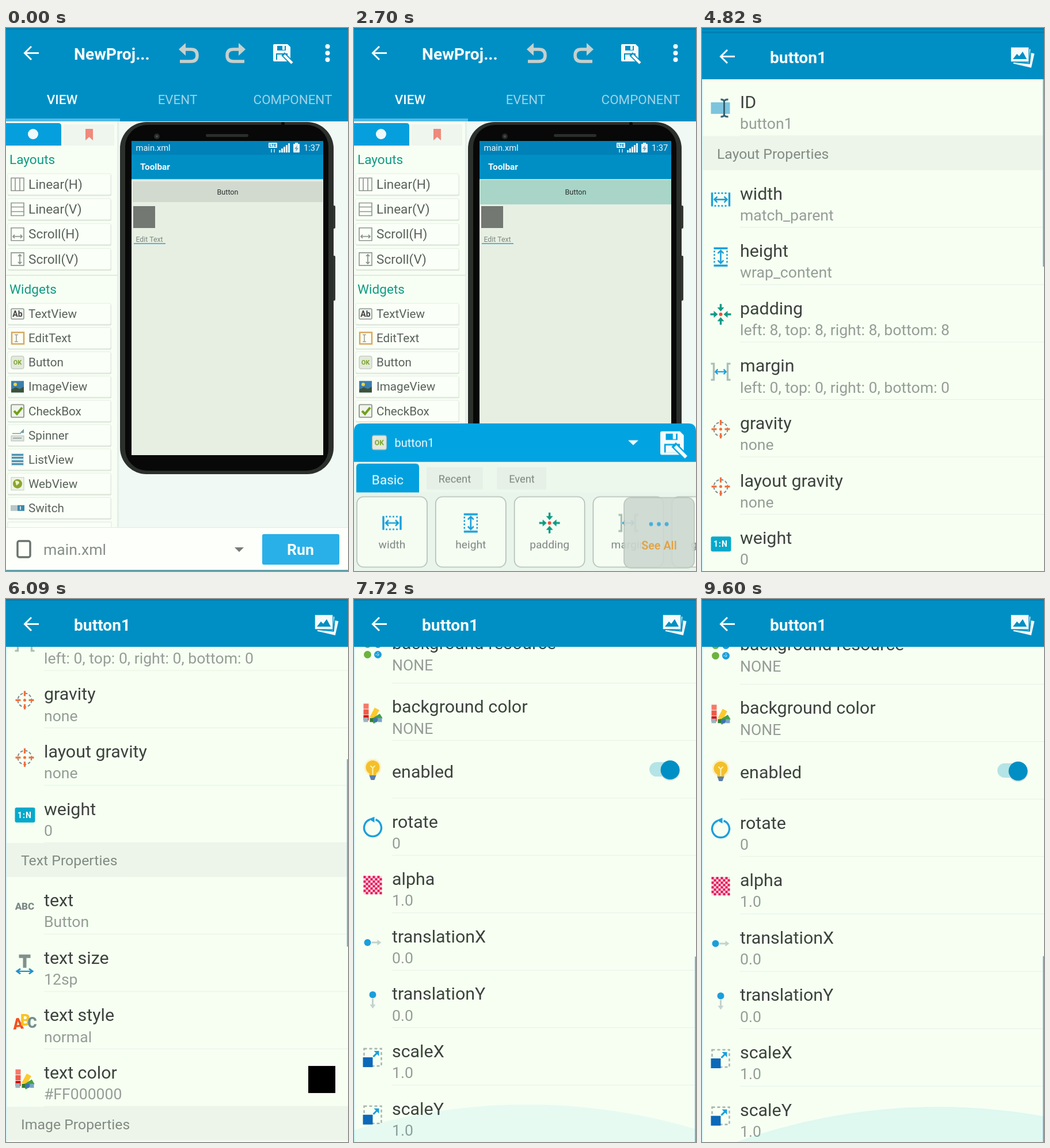
Recreate the animation shown at these times as an HTML page. Size 594x942 px, loop 9690 ms.

```html
<!DOCTYPE html>
<html lang="en">
<head>
<meta charset="utf-8">
<title>App builder: widget properties</title>
<style>
@property --s { syntax: '<number>'; inherits: true; initial-value: 0; }
html, body { margin: 0; width: 100%; height: 100%; overflow: hidden; background: #f7fff3; }
svg { display: block; width: 100%; height: 100%; font-family: Roboto, sans-serif; }
.sel, .sheet, .page, .glow { animation: 9690ms linear infinite; }
.sel { animation-name: sel; }
.sheet { animation-name: sheet; }
.page { animation-name: open, scroll; }
.glow { animation-name: glow; fill: #0ab4d6; }
.list { transform: translateY(calc(var(--s) * -1px)); }
.bar { transform: translateY(calc(var(--s) * .379px)); }
@keyframes sel {
  0%, 24.76% { opacity: 0; }
  24.77%, 100% { opacity: 1; }
}
@keyframes sheet {
  0%, 24.4% { transform: translateY(264px); animation-timing-function: cubic-bezier(.2, .5, .3, 1); }
  28.8%, 100% { transform: none; }
}
@keyframes open {
  0%, 45.7% { transform: translateY(75px); opacity: 0; }
  45.8% { transform: translateY(75px); opacity: .1; animation-timing-function: ease-out; }
  48% { opacity: 1; }
  49.74% { transform: translateY(6px); animation-timing-function: ease-out; }
  51.5%, 100% { transform: none; opacity: 1; }
}
@keyframes scroll {
  0%, 58.9% { --s: 0; animation-timing-function: cubic-bezier(.4, .1, .7, .9); }
  62.85% { --s: 513.5; animation-timing-function: cubic-bezier(.15, .6, .4, 1); }
  68.4%, 71.8% { --s: 680; animation-timing-function: cubic-bezier(.4, .1, .5, 1); }
  79%, 96% { --s: 1417.7; }
  99%, 100% { --s: 1415.8; }
}
@keyframes glow {
  0%, 78.4% { transform: translate(300px, 945px); opacity: .03; }
  79.6%, 82% { transform: translate(300px, 877px); opacity: .07; }
  87% { transform: translate(300px, 945px); opacity: 0; }
  96% { transform: translate(410px, 945px); opacity: .03; }
  99%, 100% { transform: translate(410px, 881px); opacity: .1; }
}
</style>
</head>
<body>
<svg id="stage" viewBox="0 0 594 942"></svg>
<script>
const BLUE = '#008fc4', SKY = '#1a9fdc', GREY = '#8d968e', GREEN = '#0f9a85', ORANGE = '#f0703c';

const rect = (x, y, w, h, fill, more = '') =>
  `<rect x="${x}" y="${y}" width="${w}" height="${h}" fill="${fill}" ${more}/>`;
const dot = (x, y, r, fill, more = '') => `<circle cx="${x}" cy="${y}" r="${r}" fill="${fill}" ${more}/>`;
const line = (d, color, w = 2, more = '') =>
  `<path d="${d}" fill="none" stroke="${color}" stroke-width="${w}" ${more}/>`;
const fill = (d, color) => `<path d="${d}" fill="${color}"/>`;
const at = (x, y, body, more = '') => `<g transform="translate(${x} ${y}) ${more}">${body}</g>`;
// cy is the middle of the text line
const text = (x, cy, size, str, color, more = '') =>
  `<text x="${x}" y="${cy + size * .345}" font-size="${size}" fill="${color}" ${more}>${str}</text>`;
const MID = 'text-anchor="middle"', BOLD = 'font-weight="700"';

const arrows = color => line('M-11 0H11M-6-5L-11 0L-6 5M6-5L11 0L6 5', color, 2.6);
const spin = (body, deg) => `<g transform="rotate(${deg})">${body}</g>`;
const around = body => [0, 90, 180, 270].map(a => spin(body, a)).join('');

const widthIcon = line('M-15-12V12M15-12V12', SKY, 3.4) +
  line('M-11-11H12M-11 11H12', SKY, 2.6, 'stroke-dasharray="3 3"') + arrows(SKY);
const swatches = ['#f47a68', '#ee5a4a', '#d50000'].map((c, i) => rect(-16, -16 + i * 10, 9, 9, c)).join('') +
  at(-5, 7, rect(0, -18, 9, 18, '#fdc92c'), 'rotate(28)') +
  at(-3, 11, rect(0, -18, 9, 18, '#43a047'), 'rotate(58)') +
  rect(-16, 8, 8, 8, '#9fb3bb') + rect(-5, 9, 6, 7, '#2e7d32') + rect(2, 9, 6, 7, '#3e74b5') + rect(9, 9, 7, 7, '#7ba4c9');
let checks = rect(-16, -16, 32, 32, '#fbd3dc');
for (let i = 0; i < 64; i++) {
  const x = i % 8, y = i >> 3;
  if ((x + y) % 2 === 0) checks += rect(-16 + x * 4, -16 + y * 4, 4, 4, '#e3155a');
}
const slide = dot(-9, 0, 6, SKY) + line('M-2 0H11', '#c3d3cc', 3) + fill('M8-5L15 0L8 5Z', '#c3d3cc');
const letters = (size, colors) => [...'ABC'].map((ch, i) =>
  text(-11 + i * 11, 0, size, ch, colors[i], MID + ' font-weight="900"')).join('');
const grow = line('M-15-15H15V15H-15Z', '#a9b8ae', 2.6, 'stroke-dasharray="5 4"') +
  rect(-17, 0, 17, 17, '#0c68b8') + line('M1-1L8-8', SKY, 3) + fill('M2-11H11V-2Z', SKY);

const icons = {
  id: rect(-17, -10, 33, 20, '#7cc4de') + line('M6-12V12M0-15Q6-15 6-11Q6-15 13-15M0 15Q6 15 6 11Q6 15 13 15', '#37606f', 3),
  width: widthIcon,
  height: spin(widthIcon, 90),
  padding: around(line('M-18 0H-9', GREEN, 3.4) + fill('M-12-6L-5 0L-12 6Z', GREEN)) + dot(0, 0, 3, '#f0503c'),
  margin: line('M-17-14H-12V14H-17M17-14H12V14H17', '#aebfb5', 3.4) + at(0, 0, arrows(SKY), 'scale(.85)'),
  gravity: dot(0, 0, 12, 'none', 'stroke="#7d8a88" stroke-width="2" stroke-dasharray="5 3"') +
    around(line('M-16 0H-7', ORANGE, 3.2)) + dot(0, 0, 2.5, ORANGE),
  weight: rect(-17, -13, 35, 26, '#06a9cb', 'rx="3"') + text(0, 0, 14, '1:N', '#fff', MID + BOLD + ' letter-spacing="1"'),
  text: letters(17, ['#7d8a86', '#7d8a86', '#7d8a86']),
  size: line('M-10-13H10M0-14V7', '#81908d', 6) + at(0, 13, arrows('#2492c9'), 'scale(1.25 .9)'),
  style: spin(text(-12, 3, 27, 'A', '#f4511e', MID + ' font-weight="900"'), -6) +
    text(1, -2, 27, 'B', '#fbc31e', MID + ' font-weight="900"') + text(13, 3, 25, 'C', '#73908f', MID + ' font-weight="900"'),
  color: swatches,
  resource: dot(-9, -9, 6.5, '#6cb33f') + dot(9, -9, 6.5, SKY) + dot(-9, 9, 6.5, '#6cb33f') + dot(9, 9, 6.5, SKY) +
    line('M5 9H13M9 5V13', '#bfe4f5', 1.5, 'stroke-dasharray="2 2"'),
  bulb: dot(0, -5, 15, '#fbf1c8') + dot(0, -5, 12, '#f3c02a') + fill('M-6 4H6V9H-6Z', '#f3c02a') +
    line('M-4-8L0-4L4-8M0-4V8', '#fff3b8', 2) + fill('M-6 9H6L3 17H-3Z', '#5b7fa8'),
  rotate: line('M-5-14A15 15 0 1 0 5-14', SKY, 3.4) + fill('M-7-15L3-19V-9Z', SKY),
  alpha: checks,
  moveX: slide,
  moveY: spin(slide, 90),
  scale: grow
};

const backArrow = line('M57 43.5H33M44 32L32.5 43.5L44 55', '#f4fbfb', 3);
const save = bg => fill('M2 0H25L30 5V28Q30 30 28 30H2Q0 30 0 28V2Q0 0 2 0Z', '#f6fcfa') +
  rect(7, 3, 15, 8, bg) + rect(16, 3, 4, 7, '#f6fcfa') + rect(5, 16, 20, 11, bg) + rect(7, 18, 16, 9, '#f6fcfa') +
  line('M17 17L32 32', bg, 8) + line('M19 19L33 33', '#f6fcfa', 4.5);
const undo = line('M308 37H321Q332 37 332 47.5Q332 58 321 58H302', '#c6d0cc', 5.5) + fill('M300 37L312 26V48Z', '#c6d0cc');
const okIcon = rect(-11, -11, 22, 22, '#e3e9dd', 'rx="3" stroke="#b4bdb2"') + text(0, 0, 11, 'OK', '#7ba52c', MID + BOLD);

function panel() {
  const box = line('M-11-11H11V11H-11Z', GREY, 1.6);
  const bars = box + line('M-4-11V11M4-11V11', GREY, 1.6);
  const pan = box + line('M-8 4H8M-5 1L-8 4L-5 7M5 1L8 4L5 7', GREY, 1.8);
  const layouts = [['Linear(H)', bars], ['Linear(V)', spin(bars, 90)], ['Scroll(H)', pan], ['Scroll(V)', spin(pan, -90)]];
  const widgets = [
    ['TextView', rect(-11, -9, 22, 18, '#eef2ec', 'rx="2" stroke="#8d968e" stroke-width="1.5"') + text(0, 0, 14, 'Ab', '#444', MID + BOLD)],
    ['EditText', rect(-10, -10, 21, 20, '#fdfdf4', 'stroke="#d8a860" stroke-width="2.5"') + line('M-5-6H1M-2-6V6M-5 6H1', GREY, 1.4)],
    ['Button', okIcon],
    ['ImageView', rect(-11, -10, 22, 20, '#3a7fae') + dot(-4, -4, 3, '#f2d23c') + fill('M-11 10V5L-3 1L4 4L11 0V10Z', '#3d5238')],
    ['CheckBox', rect(-11, -11, 22, 22, '#f0f4ea', 'rx="2" stroke="#8d968e" stroke-width="1.8"') + line('M-6 0L-1 5L8-6', '#6fa01e', 4)],
    ['Spinner', rect(-11, 1, 22, 9, '#dfe6e2', 'stroke="#b5c0b8"') + line('M-8 5H7M-9-3H6', GREY, 1.5) + fill('M4-4L11-11V-4Z', '#6f9cae')],
    ['ListView', rect(-11, -11, 22, 22, '#d5e5ea') + line('M-10-8H10M-10-3H10M-10 3H10M-10 8H10', '#4a93b0', 3)],
    ['WebView', rect(-11, -11, 22, 22, '#eef3ea', 'stroke="#c5cec3"') + dot(0, 0, 8, '#8aa62c') + fill('M-4-5Q3-6 3-1L-2 3Z', '#eef3c8')],
    ['Switch', rect(-12, -5, 12, 10, '#b9c6c8') + rect(0, -5, 12, 10, '#3f87ac') + rect(4, -3, 2, 6, '#cfe3ea')]
  ];
  const card = (cy, size, [name, icon]) => rect(3, cy - 17, 180, 37, '#dce4da', 'rx="2"') +
    rect(3, cy - 18.5, 179, 36.5, '#fafff7', 'rx="2" stroke="#e6ede4"') + at(20, cy, icon) + text(39, cy, size, name, '#59625b');
  return rect(0, 162, 194, 706, '#f7fff4') + rect(193, 162, 3, 706, '#e6eeea') +
    fill('M0 204V165H91Q96 165 96 170V204Z', '#069fdd') + dot(47, 184, 9, '#eef9fb') +
    rect(100, 167, 88, 37, '#eff6ee') + fill('M138 175H151V195L144.500 189L138 195Z', '#ef8a7c') +
    text(6, 228, 22.6, 'Layouts', GREEN) + layouts.map((w, i) => card(271.3 + i * 43.2, 22.6, w)).join('') +
    rect(0, 428, 194, 2, '#e2eae1') + text(6, 453, 22.6, 'Widgets', GREEN) +
    widgets.map((w, i) => card(496 + i * 42.1, 20.7, w)).join('') + rect(3, 857, 180, 12, '#fafff7', 'stroke="#e0e8de"');
}

function phone() {
  const signal = [4, 7, 10, 13, 16].map((h, i) => rect(474 + i * 4, 216 - h, 3, h, '#e8f5f8')).join('');
  return rect(566, 308, 6, 40, '#343834', 'rx="2"') + rect(566, 395, 6, 78, '#343834', 'rx="2"') +
    rect(198, 163, 371, 611, '#2c302c', 'rx="46"') + rect(207, 168, 353, 600, '#070807', 'rx="38"') +
    dot(262, 188, 5, '#262a28') + dot(262, 188, 2, '#4a504d') + rect(347, 184, 74, 5, '#2a2e2b', 'rx="2.5"') + dot(481, 166, 3, '#0a0b0a') +
    rect(218, 196, 333, 545, '#e7efe3') + rect(218, 196, 333, 24, '#0081b8') + rect(218, 220, 333, 42, BLUE) + rect(218, 262, 333, 2, '#cfd8cf') +
    text(225.5, 208, 14.7, 'main.xml', '#eef8fa') + text(233, 241, 15.4, 'Toolbar', '#f4fbfc', BOLD) +
    rect(456, 199, 15, 9, '#e8f5f8', 'rx="1"') + text(463.5, 203.5, 7.5, 'LTE', '#0081b8', MID + BOLD) +
    line('M461 210V216M466 210V216', '#9fd2e4', 2) + signal +
    rect(499, 201, 11, 15, '#e8f5f8', 'rx="1"') + rect(502, 199, 5, 3, '#e8f5f8') + fill('M506 203L501 210H504L503 215L508 208H505Z', '#7fa9ba') +
    text(517, 208, 14.7, '1:37', '#eef8fa') +
    rect(220, 266, 330, 36, '#d2dad0') + `<g class="sel">${rect(219, 264, 332, 42, '#a8d5c8')}</g>` +
    text(385, 285, 12.6, 'Button', '#2b302c', MID) + rect(221, 309, 38, 38, '#737873') +
    text(225.5, 367, 12.3, 'Edit Text', '#7c877e') + rect(222, 373, 55, 2, '#5cb3d3');
}

function editor() {
  const bottom = rect(0, 866, 594, 76, '#fcfffa') + rect(0, 866, 594, 1, '#e3ebe3') +
    rect(20, 890, 22, 28, 'none', 'rx="3" stroke="#6b716c" stroke-width="3.4"') + text(65, 905, 26.6, 'main.xml', '#878e88') +
    fill('M397 901H413L405 909Z', '#757c76') + rect(445, 878, 134, 53, '#2ab0e8', 'rx="3"') + text(511.5, 905, 26.6, 'Run', '#f8fdfd', MID + BOLD);
  return rect(0, 0, 594, 942, '#f1f9f4') + panel() + phone() + bottom +
    rect(0, 0, 594, 162, BLUE) + rect(0, 0, 594, 3, '#0080b2') + rect(0, 157, 198, 5, '#51bae6') + backArrow +
    text(118, 45, 28.2, 'NewProj...', '#f6fcfc', BOLD) + undo + at(716, 0, undo, 'scale(-1 1)') + at(464, 28, save(BLUE)) +
    [32, 43.5, 55].map(y => dot(558.5, y, 4, '#f4fbfb')).join('') +
    text(97.5, 124.5, 22.6, 'VIEW', '#f4fbfb', MID + ' font-weight="500"') + text(298, 124.5, 22.4, 'EVENT', '#9fd3e8', MID) +
    text(498, 124.5, 22.4, 'COMPONENT', '#9fd3e8', MID) + rect(0, 940, 594, 2, '#5f9fa8');
}

function sheet() {
  const cards = ['width', 'height', 'padding', 'margin', 'gravity'].map((name, i) => {
    const x = 5 + i * 136.8;
    return rect(x, 808.5, 122, 122, '#f5fdf3', 'rx="12" stroke="#b3bdb4" stroke-width="1.6"') +
      at(x + 61, 854, icons[name]) + text(x + 61, 891, 19.2, name, '#7d867f', MID);
  }).join('');
  return rect(0, 720, 594, 222, '#edf8ed') + rect(0, 801, 594, 141, '#e9f4ea') +
    fill('M0 748V695Q0 681 14 681H580Q594 681 594 695V748Z', '#02a3e1') + at(44, 714.5, okIcon, 'scale(1.12)') +
    text(70.5, 715.5, 20, 'button1', '#eefafc') + fill('M476 710.500H494L485 719Z', '#f4fbfc') + at(532, 695, save('#02a3e1'), 'scale(1.36)') +
    fill('M4 801V757Q4 751 10 751H107Q113 751 113 757V801Z', '#02a0de') + text(58.5, 779, 22.6, 'Basic', '#f4fbfc', MID) +
    rect(126, 757, 98, 39, '#e6f0e7', 'rx="2"') + text(175, 778, 18.3, 'Recent', '#7d867f', MID) +
    rect(248, 757, 86, 39, '#e6f0e7', 'rx="2"') + text(291.5, 778, 18.3, 'Event', '#7d867f', MID) + cards +
    rect(469, 810, 122, 122, '#cdd8d0', 'rx="12" stroke="#b3bdb4" stroke-width="1.6" opacity=".9"') +
    [516, 529.5, 543].map(x => dot(x, 856, 3.4, '#45b0dd')).join('') +
    text(530, 893, 19.8, 'See All', '#e3a03c', MID + ' font-weight="500"') + rect(0, 940, 594, 2, '#5f9fa8');
}

function page() {
  const ROW = 99.6, BAND = 59;
  const toggle = rect(513, 37, 50, 25, '#b4e4e6', 'rx="12.5"') + dot(549, 52, 17, '#cfdcd8') + dot(549, 50.5, 16.5, BLUE);
  // [icon, title, value, extra, height]; a lone string is a section heading
  const rows = [
    ['id', 'ID', 'button1'], 'Layout Properties',
    ['width', 'width', 'match_parent'], ['height', 'height', 'wrap_content'],
    ['padding', 'padding', 'left: 8, top: 8, right: 8, bottom: 8'],
    ['margin', 'margin', 'left: 0, top: 0, right: 0, bottom: 0'],
    ['gravity', 'gravity', 'none'], ['gravity', 'layout gravity', 'none'], ['weight', 'weight', '0'],
    'Text Properties',
    ['text', 'text', 'Button'], ['size', 'text size', '12sp'], ['style', 'text style', 'normal'],
    ['color', 'text color', '#FF000000', rect(525, 29, 47, 47, '#000')],
    'Image Properties',
    ['resource', 'background resource', 'NONE', '', 110], ['color', 'background color', 'NONE'],
    ['bulb', 'enabled', '', toggle], ['rotate', 'rotate', '0'], ['alpha', 'alpha', '1.0'],
    ['moveX', 'translationX', '0.0'], ['moveY', 'translationY', '0.0'], ['scale', 'scaleX', '1.0'], ['scale', 'scaleY', '1.0']
  ];
  let y = 82, list = '';
  for (const row of rows) {
    if (typeof row === 'string') {
      list += at(0, y, rect(0, 0, 594, BAND, '#edf5eb') + text(26, 30.5, 24.8, row, '#818b82'));
      y += BAND;
      continue;
    }
    const [icon, title, value, extra = '', h = ROW] = row;
    list += at(0, y, at(32.5, 51, icons[icon]) + text(66, value ? 40.5 : 53, 30.4, title, '#3b433c') +
      text(66, 78, 26.6, value, '#949e95') + extra + rect(66, h - 1, 528, 1, '#e8f0e5'));
    y += h;
  }
  const photos = at(556, 47, rect(-13, -13, 32, 25, '#f4fbfb'), 'rotate(13)') +
    at(553, 43, rect(-16, -15, 33, 26, '#f4fbfb', `stroke="${BLUE}" stroke-width="2"`), 'rotate(6)') +
    rect(536, 27, 32, 26, '#f4fbfb', `stroke="${BLUE}" stroke-width="1.5"`) + fill('M540 48L547 39L551 43L557 35L564 48Z', BLUE);
  return rect(0, 0, 594, 942, '#f7fff3') + `<g class="list">${list}</g>` + rect(0, 83, 1.5, 860, '#d3f4f8') +
    `<g class="bar">${rect(592, 83, 2, 325, '#6fb4d8')}</g><g class="glow">${dot(0, 1034, 1034, 'inherit').replace('fill="inherit"', '')}</g>` +
    rect(0, 0, 594, 83, BLUE) + rect(0, 0, 594, 3, '#0080b2') + backArrow + text(118, 45, 28.2, 'button1', '#f6fcfc', BOLD) + photos;
}

document.getElementById('stage').innerHTML =
  editor() + `<g class="sheet">${sheet()}</g><g class="page">${page()}</g>`;
</script>
</body>
</html>
```
